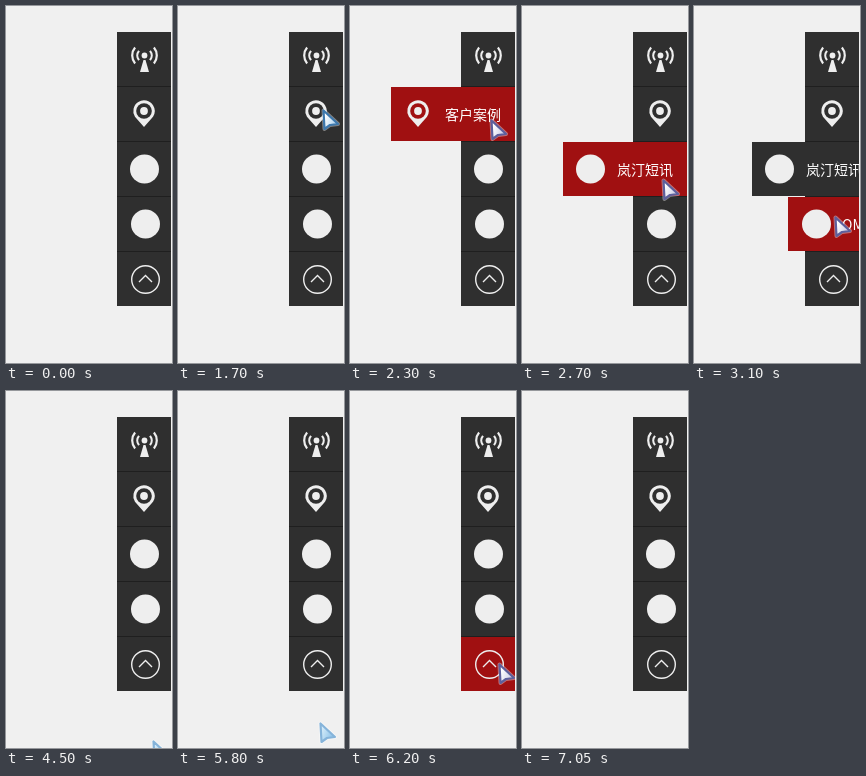
Recreate the animation shown at these times as an HTML page with a canvas. Size 166 by 357 pixels, loop 7.1 s.

```html
<!DOCTYPE html>
<html lang="zh">
<head>
<meta charset="utf-8">
<style>
  html, body { margin: 0; width: 100%; height: 100%; overflow: hidden; background: #f0f0f0; }
  canvas { display: block; }
</style>
</head>
<body>
<canvas width="166" height="357"></canvas>
<script>
const ctx = document.querySelector('canvas').getContext('2d');
const LOOP = 7100, STEP = 50;
const DARK = '#2f2f2f', RED = '#a01011', LIGHT = '#eeeeee';
const LEFT = 111, RIGHT = 165, TOP = 26, PITCH = 55, HEIGHT = 54;
const SLIDE = 70, SLIDE_MS = 200;

// Icons are drawn relative to the top left corner of their row.
const rows = [
  { icon: antenna },
  { icon: pin, label: '客户案例' },
  { icon: () => disc(27.5, 27, 14.5), label: '岚汀短讯' },
  { icon: () => disc(28.5, 27, 14.5), label: 'OM客服' },
  { icon: upArrow },
];

const rowTop = index => TOP + index * PITCH;

function swing(elapsed, duration) {
  const p = Math.min(1, Math.max(0, elapsed / duration));
  return 0.5 - Math.cos(p * Math.PI) / 2;
}

function glide(from, to, progress) {
  return { x: from.x + (to.x - from.x) * progress, y: from.y + (to.y - from.y) * progress };
}

// The pointer enters each labelled row a little sooner than the one before.
const arrival = index => 1735 + (index - 1) * (700 - 50 * (index - 2));

function tourRows(t) {
  let spot = { x: 145, y: 101 };
  for (let i = 1; i <= 3; i++) {
    const rest = { x: 140, y: 53 + 60 * i };
    spot = glide(spot, rest, swing(t - arrival(i) + 135, 350));
  }
  return spot;
}

function pointerAt(t) {
  if (t < 50) return null;
  if (t < 1700) return { x: 158, y: 107 };
  if (t < 3550) return tourRows(t);
  if (t < 3600) return { x: 141, y: 256 };
  if (t < 4500) return null;
  if (t < 5800) return { x: 146, y: 349 };
  if (t < 7050) return glide({ x: 141, y: 331 }, { x: 148, y: 270 }, swing(t - 5800, 450));
  return null;
}

function isHovered(index, t) {
  if (rows[index].label) return t >= arrival(index) && t < arrival(index + 1);
  const y = pointerAt(t)?.y;
  return y >= rowTop(index) && y < rowTop(index) + HEIGHT;
}

function disc(x, y, r, color = LIGHT) {
  ctx.fillStyle = color;
  ctx.beginPath();
  ctx.arc(x, y, r, 0, 7);
  ctx.fill();
}

function line(width, trace) {
  ctx.strokeStyle = LIGHT;
  ctx.lineWidth = width;
  ctx.beginPath();
  trace();
  ctx.stroke();
}

function polygon(...points) {
  ctx.beginPath();
  points.forEach(([x, y]) => ctx.lineTo(x, y));
  ctx.closePath();
}

function antenna() {
  for (const r of [7.2, 12.3])
    for (const side of [0, Math.PI])
      line(2.2, () => ctx.arc(27.5, 23.5, r, side - 0.7, side + 0.7));
  disc(27.5, 23.5, 2.9);
  polygon([26.5, 28], [28.5, 28], [32, 40], [23, 40]);
  ctx.fill();
}

function pin(color) {
  ctx.fillStyle = LIGHT;
  ctx.beginPath();
  ctx.arc(27, 24, 10.7, Math.PI * 0.82, Math.PI * 2.18);
  ctx.lineTo(27, 40);
  ctx.fill();
  disc(27, 24, 7.8, color);
  disc(27, 24, 3.9);
}

function upArrow() {
  line(1.4, () => ctx.arc(28.5, 27.5, 13.8, 0, 7));
  line(1.4, () => {
    ctx.moveTo(22, 30);
    ctx.lineTo(28.5, 23.5);
    ctx.lineTo(35, 30);
  });
}

function drawRow(row, index, t) {
  const color = isHovered(index, t) ? RED : DARK;
  const shift = row.label ? Math.round(SLIDE *
    (swing(t - arrival(index), SLIDE_MS) - swing(t - arrival(index + 1), SLIDE_MS))) : 0;
  ctx.save();
  ctx.translate(LEFT - shift, rowTop(index));
  ctx.beginPath();
  ctx.rect(0, 0, RIGHT - LEFT + shift, HEIGHT);
  ctx.clip();
  ctx.fillStyle = color;
  ctx.fillRect(0, 0, 124, HEIGHT);
  row.icon(color);
  if (row.label) {
    ctx.fillStyle = '#fff';
    ctx.font = '500 14px "Noto Sans CJK SC", "Noto Sans CJK", sans-serif';
    ctx.fillText(row.label, 54, 33);
  }
  ctx.restore();
}

function drawPointer(t) {
  const spot = pointerAt(t);
  if (!spot) return;
  const hovering = rows.some((row, index) => row.icon !== antenna && isHovered(index, t));
  const [inner, outer, edge] = hovering ? ['#ffffff', '#c9c9e2', '#5d5f9c']
    : spot.y < 300 ? ['#ffffff', '#a9d0ee', '#3d78ad']
    : ['#d3eaf8', '#86bfe8', '#86b4da'];
  ctx.save();
  ctx.translate(Math.round(spot.x), Math.round(spot.y));
  const shade = ctx.createLinearGradient(2, 10, 15, 15);
  shade.addColorStop(0, inner);
  shade.addColorStop(1, outer);
  polygon([1.5, 1.5], [2.5, 20], [8, 16], [16, 15]);
  ctx.lineJoin = 'round';
  ctx.lineWidth = 4;
  ctx.strokeStyle = 'rgba(255, 255, 255, 0.4)';
  ctx.stroke();
  ctx.lineWidth = 2.2;
  ctx.fillStyle = shade;
  ctx.strokeStyle = edge;
  ctx.fill();
  ctx.stroke();
  ctx.restore();
}

function draw(now) {
  const t = Math.floor((now % LOOP) / STEP) * STEP;
  ctx.fillStyle = '#f0f0f0';
  ctx.fillRect(0, 0, 166, 357);
  ctx.fillStyle = '#1f1f1f';
  ctx.fillRect(LEFT, TOP, RIGHT - LEFT, rowTop(rows.length) - TOP - 1);
  rows.forEach((row, index) => drawRow(row, index, t));
  drawPointer(t);
}

let start;
function tick(now) {
  start ??= now;
  draw(now - start);
  requestAnimationFrame(tick);
}
draw(0);
requestAnimationFrame(tick);
</script>
</body>
</html>
```
